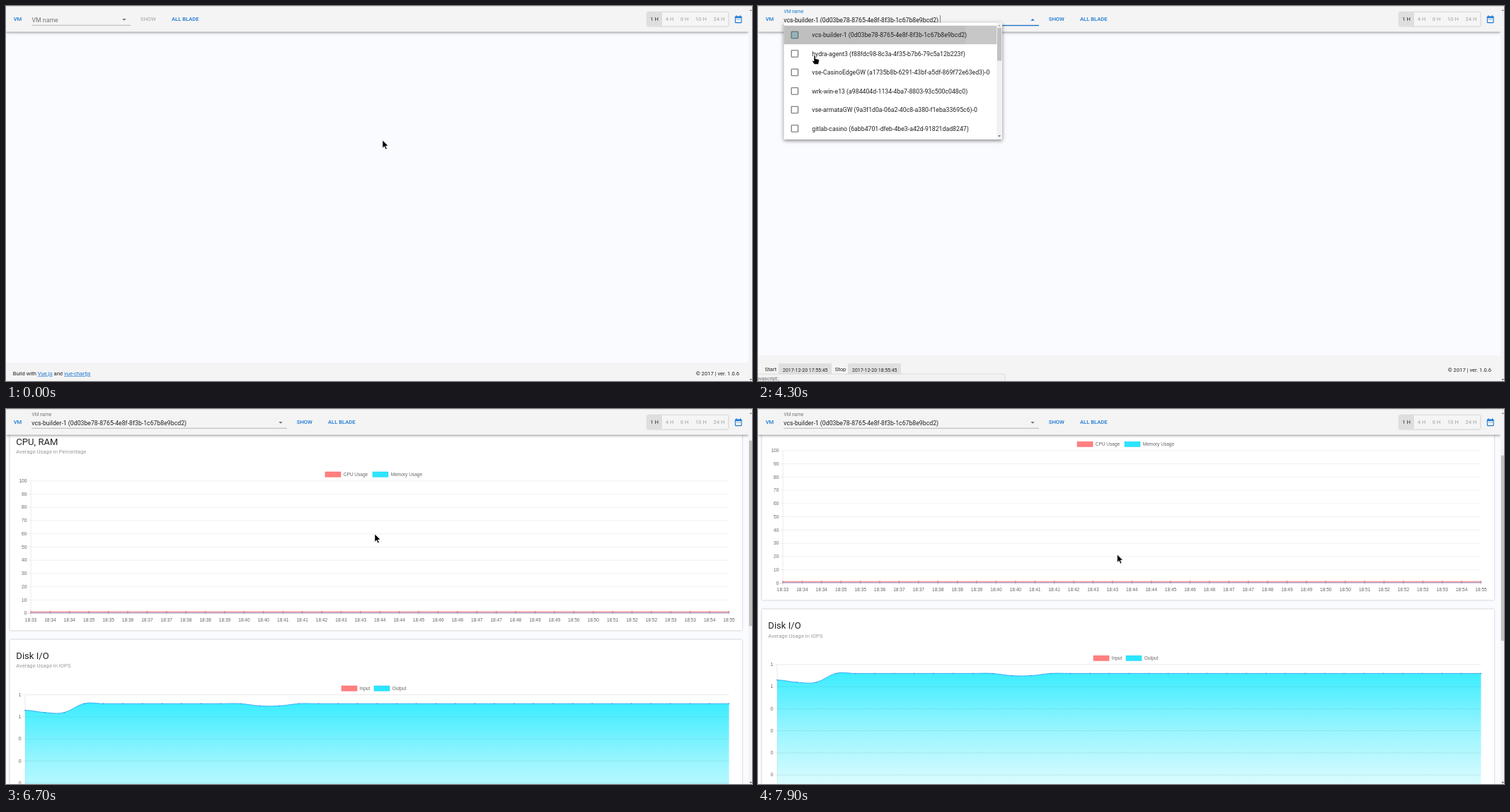
An HTML page that plays this animation: 1054x531 px, repeating every 8 s.

```html
<!DOCTYPE html>
<html lang="en">
<head>
<meta charset="utf-8">
<title>VM usage dashboard</title>
<style>
html, body { margin: 0; width: 100%; height: 100%; overflow: hidden; background: #fafbff; }
svg { display: block; width: 1054px; height: 531px; }
text { font-family: Roboto, sans-serif; white-space: pre; }
.tick { font-family: "Liberation Sans", Arial, sans-serif; }
.b { font-weight: 500; }
.bar { filter: drop-shadow(0 1px 1px rgba(0,0,0,.28)) drop-shadow(0 1px 2px rgba(0,0,0,.2)); }
.card { fill: #fff; filter: drop-shadow(0 .6px .8px rgba(0,0,0,.3)); }
.pop { filter: drop-shadow(0 2px 2px rgba(0,0,0,.3)) drop-shadow(0 1px 3px rgba(0,0,0,.2)); }
</style>
</head>
<body>
<svg id="stage" viewBox="0 0 1054 531"></svg>
<script>
const LOOP = 8000, STEP = 100;
const BLUE = '#1976d2', INK = '#222', GREY = '#757575', PALE = '#b3b3b3', BAR = '#f4f4f4';
const VM = 'vcs-builder-1 (0d03be78-8765-4e8f-8f3b-1c67b8e9bcd2)';
const ITEMS = [VM,
  'hydra-agent3 (f88fdc98-8c3a-4f35-b7b6-79c5a12b223f)',
  'vse-CasinoEdgeGW (a1735b8b-6291-43bf-a5df-869f72e63ed3)-0',
  'wrk-win-e13 (a984404d-1134-4ba7-8803-93c500c048c0)',
  'vse-armataGW (9a3f1d0a-06a2-40c8-a380-f1eba33695c6)-0',
  'gitlab-casino (6abb4701-dfeb-4be3-a42d-91821dad8247)'];

// Markup helpers
const text = (x, y, s, size, fill, attr = '') =>
  `<text x="${x}" y="${y}" font-size="${size}" fill="${fill}" ${attr}>${s}</text>`;
const rect = (x, y, w, h, fill, attr = '') =>
  `<rect x="${x}" y="${y}" width="${w}" height="${h}" fill="${fill}" ${attr}/>`;
const line = (x1, y1, x2, y2, stroke, w = .55, attr = '') =>
  `<path d="M${x1} ${y1}L${x2} ${y2}" stroke="${stroke}" stroke-width="${w}" ${attr}/>`;
const group = (id, body, attr = '') => `<g id="${id}" ${attr}>${body}</g>`;
const list = (n, fn) => Array.from({ length: n }, (_, i) => fn(i));
const tick = (x, y, s, anchor) => text(x, y, s, 6.55, '#666', `class="tick" text-anchor="${anchor}"`);
const tri = (x, y, w, h, fill) => `<path d="M${x - w} ${y - h}h${2 * w}l${-w} ${2 * h}z" fill="${fill}"/>`;

// Chart cards
const POINTS = 37, RIGHT = 1021.5, HEIGHT = 187.5;

function chart(top, c) {
  const y0 = top + 78.3, base = y0 + HEIGHT, rows = c.labels.length - 1;
  const dx = (RIGHT - c.left) / (POINTS - 1);
  let s = rect(5.5, top, 1034.5, 290, '#fff', 'class="card" rx="1"');
  s += text(14.3, top + 27.6, c.title, 13.1, INK) + text(14.3, top + 40, c.sub, 7.64, '#9a9a9a');
  c.legend.forEach(([x, name], i) => {
    s += rect(x, top + 65.6, 22, 7.2, i ? '#2ae6ff' : '#ff8080', `stroke="${i ? '#22cdf5' : '#ff6464'}" stroke-width=".55"`);
    s += tick(x + 25.7, top + 71.6, name, 'start');
  });
  c.labels.forEach((v, i) => {
    const y = y0 + HEIGHT * i / rows;
    s += line(c.left - 5.5, y, RIGHT, y, i < rows ? '#e5e5e5' : '#bdbdbd') + tick(c.left - 5.6, y + 2.3, v, 'end');
  });
  s += line(c.left, y0, c.left, base + 5, '#d9d9d9');
  s += list(POINTS, i => {
    const x = c.left + i * dx;
    return line(x, base, x, base + 2.5, '#ccc') +
      tick(x, base + 11.6, '18:' + (33 + Math.round(i * .6)), 'middle');
  }).join('');
  return s + `<g id="${c.id}"></g>`;
}

// Smooth curve through equally spaced points, tension .4
function curve(p) {
  let d = `M${p[0]}`;
  const slope = i => i && i < p.length - 1 ? .2 * (p[i + 1][1] - p[i - 1][1]) : 0;
  for (let i = 1; i < p.length; i++) {
    const [x0, y0] = p[i - 1], [x1, y1] = p[i], h = .4 * (x1 - x0);
    d += `C${x0 + h} ${y0 + slope(i - 1)} ${x1 - h} ${y1 - slope(i)} ${x1} ${y1}`;
  }
  return d;
}

function series(left, base, value, fill, stroke, dot) {
  const dx = (RIGHT - left) / (POINTS - 1);
  const p = list(POINTS, i => [left + i * dx, base - HEIGHT * value(i)]);
  const d = curve(p);
  return `<path d="${d}V${base}H${left}Z" fill="${fill}"/><path d="${d}" fill="none" stroke="${stroke}" stroke-width=".8"/>` +
    p.map(([x, y]) => `<circle cx="${x}" cy="${y}" r=".75" fill="${dot}"/>`).join('');
}

const output = i => (i < 3 ? [.53, .52, .52][i] : i === 12 || i === 13 ? .55 : .56) / .6;

function plot(p) {
  $('cpu').innerHTML =
    series(35, 363.8, () => .004 * p, '#d9f4ff', '#5b8fe0', '#4a7fd0') +
    series(35, 363.8, () => .0125 * p, 'rgba(255,90,90,.3)', '#ff8a8a', '#e86060');
  $('disk').innerHTML =
    series(27, 666.8, i => output(i) * p, 'url(#cyan)', '#2a9df4', '#2a86d8') +
    series(27, 666.8, () => .0835 * p, '#e5e2e2', '#ff7070', '#e86060') +
    list(6, i => line(27, 479.3 + 31.25 * i, RIGHT, 479.3 + 31.25 * i, 'rgba(0,0,0,.07)')).join('');
}

// Scene pieces
const io = [[474, 'Input'], [520, 'Output']];
const page =
  rect(5.5, 45, 1034.5, 27, '#fff', 'class="card" rx="1"') + text(18.7, 61.7, VM, 7.64, INK) +
  '<path transform="translate(1013.6 52) scale(.546)" d="M7.4 7.8 12 12.4l4.6-4.6L18 9.3l-6 6-6-6z" fill="#444"/>' +
  chart(98, { id: 'cpu', title: 'CPU, RAM', sub: 'Average Usage in Percentage', left: 35,
    legend: [[451, 'CPU Usage'], [518, 'Memory Usage']], labels: list(11, i => 100 - 10 * i) }) +
  chart(401, { id: 'disk', title: 'Disk I/O', sub: 'Average Usage in IOPS', left: 27,
    legend: io, labels: [1, 1, 0, 0, 0, 0, 0] }) +
  chart(704, { id: 'net', title: 'Network I/O', sub: 'Average Usage in Mbps', left: 27,
    legend: io, labels: list(11, i => i < 6 ? 1 : 0) });

const link = s => `<tspan fill="${BLUE}" text-decoration="underline">${s}</tspan>`;
const copy = y => text(1036, y, '© 2017 | ver. 1.0.6', 7.64, INK, 'text-anchor="end"');
const chip = (x, s) => rect(x, 506, 75, 18, '#e0e0e0', 'rx="1"') + text(x + 6, 517.5, s, 6.95, INK);
const footShort = rect(0, 505, 1049, 26, BAR) +
  text(9.8, 522.8, `Build with ${link('Vue.js')} and ${link('vue-chartjs')}`, 7.64, INK) + copy(522.8);
const footTall = rect(0, 495, 1049, 36, BAR) +
  text(9.8, 516.8, 'Start', 7.64, INK) + chip(29, '2017-12-20 17:55:45') +
  text(108.7, 516.8, 'Stop', 7.64, INK) + chip(127, '2017-12-20 18:55:45') + copy(517.8);

const hours = [[916, '1 H'], [937.5, '4 H'], [958.5, '6 H'], [982, '10 H'], [1007.5, '24 H']];
const header =
  rect(0, 0, 1049, 36.6, BAR, 'class="bar"') + rect(0, 0, 1054, 1, '#dcdcdc') +
  rect(1, 4, 32, 32, '#e8edf2', 'id="vmHover"') +
  text(10.7, 21.3, 'VM', 7.64, BLUE, 'class="b"') +
  '<path id="under" stroke-width=".6"/><path id="focus" stroke-width="1.1"/>' +
  text(36.5, 22.8, 'VM name', 8.73, GREY, 'id="label"') +
  text(36.3, 22.6, VM, 8.73, INK, 'id="value"') +
  `<path id="caret" stroke="#333" stroke-width=".6"/>` +
  group('tools',
    rect(176.5, 1, 50, 35.6, '#e7ebf0', 'id="showHover"') +
    '<path id="drop" d="M-2.75-1.4h5.5L0 1.4z"/>' +
    text(189.8, 21.3, 'SHOW', 7.64, PALE, 'id="show" class="b"') +
    text(234, 21.3, 'ALL BLADE', 7.64, BLUE, 'class="b"')) +
  rect(906, 9, 114.5, 19.6, '#f5f5f5', 'class="card" style="fill:#f5f5f5" rx="1"') +
  rect(906, 9, 21, 19.6, '#dedede', 'rx="1"') +
  hours.map(([x, s], i) => text(x, 21.3, s, 7.64, i ? PALE : '#555', 'class="b" text-anchor="middle"')).join('') +
  `<path transform="translate(1028.2 12.2) scale(.546)" fill="${BLUE}" fill-rule="evenodd"
    d="M5 4h1V2h2v2h8V2h2v2h1q2 0 2 2v14q0 2-2 2H5q-2 0-2-2V6q0-2 2-2zM5 9v11h14V9zM7 11h2v2H7zM11 11h2v2h-2zM15 11h2v2h-2z"/>`;

const rowY = i => 41 + 26.5 * i;
const menu = rect(36.5, 23.5, 308.5, 165.5, '#fff', 'class="pop" rx="1"') +
  rect(36.5, 27.8, 301, 26.4, '#c7c7c7', 'id="hover"') +
  '<g clip-path="url(#row)"><circle id="ripple" cx="80" cy="41" fill="#000"/></g>' +
  ITEMS.map((s, i) => rect(47.2, rowY(i) - 4.7, 9.4, 9.4, 'none', 'stroke="#666" stroke-width="1.1" rx=".6"') +
    text(76.3, rowY(i) + 3.1, s, 8.73, INK)).join('') +
  group('check', rect(46.7, 36, 10.4, 10.4, '#1c8ea3', 'rx=".8"')) +
  group('mark', '<path d="M48.6 41.3l2.3 2.3 4.4-4.6" fill="none" stroke="#fff" stroke-width="1.1"/>') +
  rect(337.3, 23.8, 7.4, 165, '#f1f1f1') + rect(338, 31, 6.2, 46.5, '#c1c1c1') +
  tri(341, 27.5, 1.8, -1, '#a3a3a3') + tri(341, 184.3, 1.8, 1, '#505050');

const status = rect(-2, 521, 351, 12, '#f2f2f2', 'stroke="#c9c9c9" stroke-width=".6" rx="1.5"') +
  text(-1.8, 530, 'avascript:;', 7, '#666');

const scrollbar = rect(1049, 1, 5, 530, '#f3f3f5') + rect(1049.8, 8, 4.2, 262.5, '#c1c1c1', 'id="thumb"') +
  tri(1052.3, 5.8, 1.6, -.9, '#666') + tri(1052.3, 529, 1.6, .9, '#444');

const cursors =
  group('arrow', '<path d="M0 0V11.2L2.6 8.8 4.4 13 6.3 12.2 4.5 8.1H8Z" fill="#000" stroke="#fff" stroke-width=".6"/>') +
  group('beam', '<path d="M-2-6Q0-6 0-5Q0-6 2-6M0-5V5M-2 6Q0 6 0 5Q0 6 2 6" fill="none" stroke="#111" stroke-width="1"/>') +
  group('hand', '<path d="M-1 .8Q0-.6 1 .8V4.6L5.2 5.6Q6.6 6 6.3 7.6L5.4 12.4H-.4L-3.4 8.2Q-3.2 6.8-1 8.2Z" fill="#000" stroke="#fff" stroke-width=".5"/>');

document.getElementById('stage').innerHTML =
  `<defs><clipPath id="row">${rect(36.5, 27.8, 301, 26.4, '#000')}</clipPath>
   <linearGradient id="cyan" gradientUnits="userSpaceOnUse" x1="0" y1="479" x2="0" y2="667">
   <stop offset="0" stop-color="#00e7ff" stop-opacity=".82"/><stop offset=".5" stop-color="#00e7ff" stop-opacity=".4"/>
   <stop offset="1" stop-color="#00e7ff" stop-opacity=".08"/></linearGradient></defs>` +
  rect(0, 0, 1054, 531, '#fafbff') + group('page', page) +
  group('footShort', footShort) + group('footTall', footTall) + header +
  group('menu', menu) + group('status', status) + scrollbar + group('cursor', cursors);

const $ = id => document.getElementById(id);
const set = (id, attrs) => { for (const k in attrs) $(id).setAttribute(k, attrs[k]); };
const show = (id, on) => { $(id).style.display = on ? '' : 'none'; };

// Motion tables: [time, value...]
const PATH = [[100, 532, 190], [300, 526, 222], [500, 480, 250], [700, 330, 190], [900, 150, 75], [1000, 111, 42],
  [1200, 105, 27], [1400, 105, 27], [1600, 60, 26], [1800, 18, 27], [2000, 20, 26], [2300, 103, 22], [2800, 103, 22],
  [3200, 98, 39], [3700, 80, 41], [4100, 79, 43], [4300, 80, 70], [4600, 230, 92], [4800, 362, 90], [5000, 402, 60],
  [5200, 421, 22], [5400, 424, 24], [5700, 492, 135], [5900, 522, 177], [6700, 521, 177], [7200, 514, 187],
  [7400, 509, 196], [7500, 508, 199], [7600, 508, 199], [7900, 507.5, 206]];
const KINDS = [[0, 'arrow'], [1200, 'beam'], [1700, 'hand'], [2100, 'beam'], [3000, 'hand'], [4800, 'arrow'], [5100, 'hand'], [5500, 'arrow']];
const SCROLL = [[6500, 0], [6600, 28], [6700, 74.6], [6900, 172], [7100, 250], [7200, 270.6], [7400, 274],
  [7600, 274], [7700, 246], [7800, 178], [7900, 117.4]];
const LABEL = [[2500, 0], [2600, .3], [2700, .78], [2800, .97], [2900, 1]];
const FOCUS = [[2500, 0], [2600, .2], [2700, .59], [2800, .93], [2900, 1]];
const MENU = [[2700, 0], [2800, .3], [2900, .75], [3000, .95], [3100, 1], [5100, 1], [5200, .4], [5300, 0]];
const RIPPLE = [[3800, 0], [3900, 50], [4000, 140], [4100, 213]];
const FADE = [[4300, .04], [4600, 0]];
const CHECK = [[4200, 0], [4300, .25], [4600, 1]];

function at(table, t) {
  if (t <= table[0][0]) return table[0].slice(1);
  for (let i = 1; i < table.length; i++) {
    const a = table[i - 1], b = table[i];
    if (t <= b[0]) return a.slice(1).map((v, k) => v + (b[k + 1] - v) * (t - a[0]) / (b[0] - a[0]));
  }
  return table[table.length - 1].slice(1);
}
const num = (table, t) => at(table, t)[0];

function draw(t) {
  const picked = t >= 4200, loaded = t >= 5400, focused = t >= 2600 && t < 5200;
  const shift = picked ? 221 : 0, end = 176 + shift;

  const scroll = num(SCROLL, t);
  show('page', loaded);
  set('page', { transform: `translate(0 ${-scroll})` });
  if (loaded) plot(1 - (1 - Math.min(1, (t - 5400) / 1000)) ** 4);
  show('thumb', loaded);
  set('thumb', { y: 8 + scroll * .492 });
  show('footShort', !picked);
  show('footTall', picked && !loaded);

  const k = num(LABEL, t);
  set('label', { y: 22.8 - 13.2 * k, 'font-size': 8.73 - 2.18 * k, fill: focused ? BLUE : GREY });
  const hot = focused || t >= 1200 && t < 1600 || t >= 2200 && t < 2600;
  set('under', { d: `M36.5 27.3H${end}`, stroke: hot ? '#555' : '#8a8a8a' });
  const mid = (36.5 + end) / 2, half = num(FOCUS, t) * (end - 36.5) / 2;
  set('focus', { d: `M${mid - half} 27.6H${mid + half}`, stroke: BLUE });
  show('focus', focused);
  show('value', picked);
  show('caret', focused && Math.floor((t - (picked ? 4200 : 2700)) / 500) % 2 === 0);
  set('caret', { d: `M${picked ? 257.5 : 37} 13V25.5` });
  const turn = focused ? -180 * num([[2500, 0], [2700, .75], [2800, 1]], t) : 0;
  set('drop', { transform: `translate(167 19.3) rotate(${turn})`, fill: focused ? BLUE : GREY });
  set('tools', { transform: `translate(${shift} 0)` });
  set('show', { fill: picked ? BLUE : PALE });
  show('vmHover', t >= 1700 && t < 2100);
  show('showHover', t >= 5100 && t < 6600);

  const m = num(MENU, t), s = .6 + .4 * m;
  show('menu', m > 0);
  set('menu', { opacity: m, transform: `translate(36.5 23.5) scale(${s}) translate(-36.5 -23.5)` });
  show('hover', t >= 3100 && t < 4700);
  set('ripple', { r: num(RIPPLE, t), opacity: num(FADE, t) });
  set('check', { opacity: num(CHECK, t) });
  show('mark', t >= 4500);
  show('status', t >= 3300 && t < 4900);

  const [x, y] = at(PATH, t);
  const kind = KINDS.filter(r => r[0] <= t).pop()[1];
  set('cursor', { transform: `translate(${x} ${y})` });
  ['arrow', 'beam', 'hand'].forEach(id => show(id, id === kind));
}

const start = performance.now();
let last = -1;
function frame() {
  const t = Math.floor((performance.now() - start) % LOOP / STEP) * STEP;
  if (t !== last) draw(last = t);
  requestAnimationFrame(frame);
}
draw(0);
requestAnimationFrame(frame);
</script>
</body>
</html>
```
